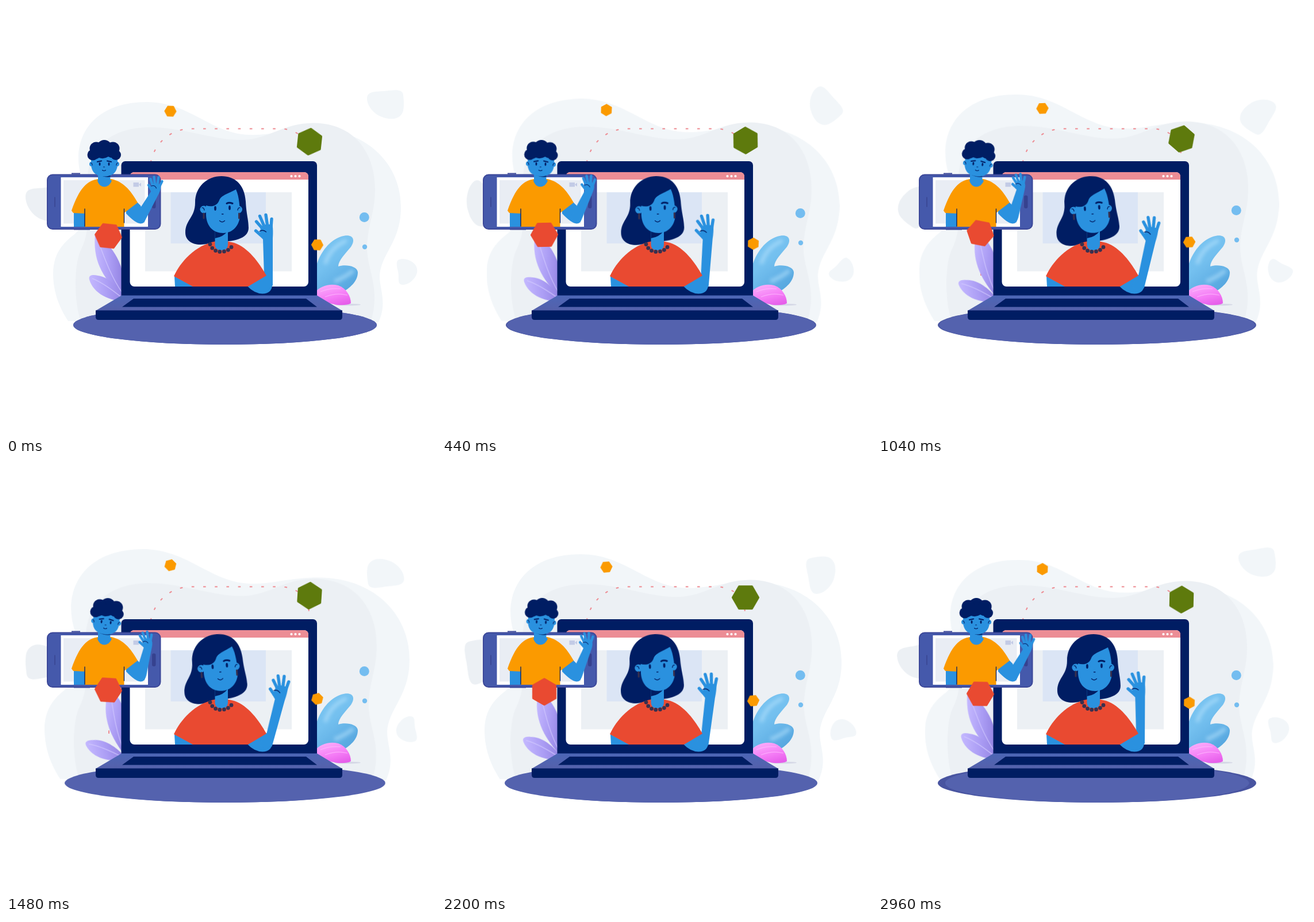
An HTML page without scripts for the animation above (3000 ms loop, 748 by 748 pixels).

```html
<!DOCTYPE html>
<html lang="en">
<head>
<meta charset="utf-8">
<title>Video call</title>
<style>
html, body { margin: 0; width: 100%; height: 100%; overflow: hidden; background: #fff; }
svg { display: block; width: 100vw; height: 100vh; }
.navy { fill: #001d63; }
.skin { fill: #2a91df; }
.ink { fill: none; stroke: #001d63; stroke-linecap: round; }
.fingers { fill: none; stroke: #2a91df; stroke-linecap: round; }
.glow { fill: none; stroke-linecap: round; filter: url(#soft); }
.pale { fill: #f2f6f9; }
.mist { fill: #ecf0f4; }

.grow, .grow2, .base, .bob, .leaf1, .leaf2 { animation: 1.5s linear infinite alternate; }
.grow { animation-name: grow; transform-origin: 384.5px 547px; }
.grow2 { animation-name: grow2; transform-origin: 381px 545px; }
.base { animation-name: base; transform-origin: 381px 555px; }
.bob { animation-name: bob; }
.leaf1 { animation-name: leaf1; transform-origin: 210px 510px; }
.leaf2 { animation-name: leaf2; transform-origin: 210px 510px; }
@keyframes grow { to { transform: scale(1.05); } }
@keyframes grow2 { to { transform: scale(1.011); } }
@keyframes base { to { transform: scaleX(1.057); } }
@keyframes bob { to { transform: translateY(-7px); } }
@keyframes leaf1 { to { transform: rotate(12deg); } }
@keyframes leaf2 { to { transform: rotate(-12deg); } }

.ring { animation: ring 3s linear infinite; transform-origin: 381px 555px; }
@keyframes ring { 0%, 66.67% { transform: none; } 33.33%, 100% { transform: scaleX(1.051); } }

.spin { animation: spin 3s linear infinite; }
@keyframes spin { to { transform: rotate(360deg); } }
.tumble { animation: tumble 3s linear infinite; }
@keyframes tumble {
  0% { transform: rotate(32deg); } 14.67% { transform: rotate(62deg); }
  34.67% { transform: rotate(87deg); } 49.33% { transform: rotate(135deg); }
  73.33% { transform: rotate(205deg); } 88% { transform: rotate(276deg); }
  98.67%, 100% { transform: rotate(302deg); }
}
.drift { animation: drift 3s linear infinite; }
@keyframes drift {
  14.67% { transform: translate(3px, 3px); } 34.67% { transform: translate(1px, 17px); }
  49.33% { transform: translateY(19px); } 73.33% { transform: translateY(22px); }
  88% { transform: translate(-2px, 5px); }
}
.float { animation: float 3s linear infinite; }
@keyframes float {
  0%, 66.67%, 100% { transform: none; } 14.67%, 49.33% { transform: translateY(-7px); }
  33.33% { transform: translateY(-12.5px); }
}

/* --a is the full swing angle */
.sway { animation: sway 3s linear infinite; }
@keyframes sway {
  0%, 100% { transform: none; }
  14.67% { transform: rotate(calc(var(--a) * .31)); }
  34.67% { transform: rotate(calc(var(--a) * .89)); }
  44%, 49.33% { transform: rotate(var(--a)); }
  73.33% { transform: rotate(calc(var(--a) * .51)); }
  88% { transform: rotate(calc(var(--a) * .19)); }
}
.armW { --a: 15.5deg; transform-origin: 446px 484px; }
.headW { --a: -4deg; transform-origin: 372px 418px; }
.armM { --a: -16deg; transform-origin: 234px 366px; }
.headM { --a: 6deg; transform-origin: 172px 305px; }
</style>
</head>
<body>
<svg viewBox="0 0 748 748">
<defs>
  <path id="hex" d="M0-22 19-11V11L0 22-19 11V-11Z" fill="currentColor" stroke="currentColor" stroke-width="4" stroke-linejoin="round"/>
  <path id="pebble" d="M-32-10C-32-23-18-22-2-23 14-25 30-28 31-16 32-8 33 6 30 14 25 25 12 28-3 23-18 19-32 4-32-10Z"/>
  <filter id="soft" x="-50%" y="-50%" width="200%" height="200%"><feGaussianBlur stdDeviation="3"/></filter>
  <linearGradient id="lilac"><stop stop-color="#c4b8ff"/><stop offset=".5" stop-color="#ab9df4"/><stop offset="1" stop-color="#9080e0"/></linearGradient>
  <linearGradient id="sky" x1="0" y1="0" x2=".6" y2="1"><stop stop-color="#7cc6f2"/><stop offset=".5" stop-color="#74c0ef"/><stop offset="1" stop-color="#58a8e0"/></linearGradient>
  <linearGradient id="pink" x1=".2" y1="0" x2=".7" y2="1"><stop stop-color="#fbb0fb"/><stop offset=".6" stop-color="#f57df6"/><stop offset="1" stop-color="#e65fea"/></linearGradient>
  <linearGradient id="deck" x1="0" y1="0" x2="0" y2="1"><stop stop-color="#4c66b6"/><stop offset="1" stop-color="#5561ab"/></linearGradient>
</defs>

<!-- backdrop -->
<path class="pale grow" d="M108 548C94 526 82 500 82 465 82 430 100 412 118 398 150 372 140 330 130 295 113 230 150 167 245 167 312 167 348 211 403 222 450 230 480 214 535 214 628 214 687 275 687 350 687 410 653 430 650 468 649 492 664 515 648 550Z"/>
<path class="mist grow2" d="M130 548C118 515 118 450 130 425 150 385 140 345 142 300 143 245 185 211 250 211 310 211 360 234 412 233 460 231 480 204 535 203.500 606 204 642 255 642 320 642 358 629 382 628 420 628 460 652 490 635 548Z"/>
<g class="drift"><g transform="translate(660 171)"><use href="#pebble" class="pale spin"/></g></g>
<g transform="translate(697 462)"><path class="pale spin" d="M-15-20C-6-25 8-20 14-13 21-5 19 6 11 14 5 21-5 25-11 22-16 19-13 9-15 0-17-8-19-17-15-20Z"/></g>
<g transform="translate(66 344) scale(1 1.2)"><use href="#pebble" class="mist spin"/></g>

<g class="float" fill="#74bdf0"><circle cx="623.3" cy="367.5" r="8.5"/><circle cx="624" cy="419" r="4.2"/></g>

<ellipse class="ring" cx="381" cy="555" rx="264" ry="34" fill="#4854a0"/>
<ellipse class="base" cx="381" cy="555" rx="264" ry="34" fill="#5462ae"/>

<!-- dashed route -->
<g fill="none" stroke="#ee8b92" stroke-width="2">
  <path d="M179 469V420" stroke-dasharray="5.5 15.5"/>
  <path d="M252 271C258 240 285 213.500 322 213.500H475C505 213.500 527 230 527 260" stroke-dasharray="4.6 15.6" stroke-dashoffset="2"/>
</g>

<!-- plants -->
<g class="leaf1">
  <path d="M206 508C175 480 150 450 155 398 180 410 212 450 206 508Z" fill="url(#lilac)"/>
  <path d="M160 408C170 435 182 470 203 500" fill="none" stroke="#d3caff" stroke-width="1.5" opacity=".7"/>
</g>
<g class="leaf2">
  <path d="M210 514C180 514 152 500 145 476 143 468 150 467 160 469 182 472 200 494 210 514Z" fill="url(#lilac)"/>
  <path d="M150 474C168 481 188 496 206 511" fill="none" stroke="#d3caff" stroke-width="1.5" opacity=".7"/>
</g>
<path d="M541 448C548 428 562 408 583 401 603 395 609 406 600 419 590 431 578 443 578 453 590 449 611 452 612 463 612 480 598 490 583 500H538Z" fill="url(#sky)"/>
<path class="glow" stroke="#b4e1fc" stroke-width="7" opacity=".6" d="M556 446C562 428 575 416 590 409M574 478C584 474 594 468 602 462"/>
<ellipse cx="594" cy="519.5" rx="23" ry="1.8" fill="#d5d8e6"/>
<path d="M536 500C545 487 563 482 578 486 592 491 600 505 600 517Q594 521 576 520L548 514Z" fill="url(#pink)"/>
<path d="M547 497Q564 490 582 492M555 506Q575 498 594 503" fill="none" stroke="#ffc5ff" stroke-width="1.2" opacity=".6"/>

<!-- laptop -->
<rect class="navy" x="200.500" y="270" width="340.500" height="240" rx="7"/>
<rect x="215.500" y="289" width="310.500" height="199" rx="8" fill="#fff"/>
<path d="M215.500 302V297Q215.500 289 223.500 289H518Q526 289 526 297V302Z" fill="#ec8d95"/>
<g fill="#fff"><circle cx="496.500" cy="296" r="2.1"/><circle cx="503.500" cy="296" r="2.1"/><circle cx="510.500" cy="296" r="2.1"/></g>
<path class="mist" d="M242 324H497V461.500H242Z"/>
<path d="M286.500 324H452V413H286.500Z" fill="#dbe5f5"/>
<path d="M201 503.500H541L585 530H156Z" fill="url(#deck)"/>
<path class="navy" d="M222 509H522L541 523.500H202ZM156 529.500H585V541Q585 546 580 546H161Q156 546 156 541Z"/>

<!-- woman -->
<g class="headW sway">
  <path class="navy" d="M375 296C350 296 329 314 329 342 329 368 312 372 312 394 312 408 324 415 338 415 350 415 360 410 372 410 392 410 422 406 422 386 422 372 418 362 417 340 415 310 398 296 375 296Z"/>
</g>
<path class="skin" d="M452 468 420 487.500Q432 500 446 500.500 462 500 463 486L460 470Z"/>
<g class="armW sway">
  <path class="skin" d="M443 385Q451 377 463.500 381 465 390 464 404V486Q454 498 441 488L449 468 447 406 441 399Z"/>
  <path class="fingers" stroke-width="5.400" d="M447 402 434.500 391M447 388 435.500 375M449.500 384 441.500 365.500M455 384 452 363.500M461 385 462 370.500"/>
  <path class="ink" stroke-width="1.300" d="M441 392Q447 388 452.500 393"/>
</g>
<path class="skin" d="M293 470 326 488H294Z"/>
<path d="M366 409C328 416 303 446 292 470L325 488H421L453 469C440 446 421 420 397 412L384 409Z" fill="#e94a31"/>
<path class="skin" d="M363.500 384H386V414Q386 425 375 425 363.500 425 363.500 414Z"/>
<path class="navy" d="M363.500 391H386Q378 402 363.500 404Z"/>
<path d="M355 414.500Q360 427.500 374 427.500 390 427 395 414" fill="none" stroke="#39304e" stroke-width="6.800" stroke-linecap="round" stroke-dasharray="0 7.500"/>
<g class="headW sway">
  <g class="skin"><circle cx="344" cy="354" r="6.500"/><circle cx="404.500" cy="354" r="6.500"/>
    <path d="M348 347C358 350 367 348 371 338 374 329 388 326 400 319 406 332 407 352 407 366 405 384 393 395 378 395 361 395 349 384 348 364Z"/></g>
  <ellipse class="navy" cx="364" cy="352" rx="1.900" ry="4"/><ellipse class="navy" cx="389" cy="351" rx="1.900" ry="4"/>
  <path class="ink" stroke-width="3" d="M384 343.500Q388 341 394 343.500"/>
  <path class="ink" stroke-width="1.300" d="M371.500 373.500Q376 378 380.500 373.500M375.500 362H378M341 351Q344 350 345 355M407 351Q404 350 403 355"/>
  <path d="M344 361V369M405.500 361V369" stroke="#39304e" stroke-width="3" stroke-linecap="round"/>
</g>

<!-- phone -->
<path d="M114 291.500H129M178 291.500H186M118 388.500H146" stroke="#3a4697" stroke-width="2"/>
<rect x="72" y="293.500" width="196.500" height="94.500" rx="9" fill="#4559ab" stroke="#3c4899" stroke-width="2"/>
<path d="M95.500 298H247V384H95.500Z" fill="#fff"/>
<path d="M100 303H241.500V378.500H100Z" fill="#e9edf4"/>
<path d="M85 333V349" stroke="#38458f" stroke-width="1.500" stroke-linecap="round"/>
<rect x="254" y="329.500" width="6.500" height="22.500" rx="3" fill="#36428f"/>
<path d="M221.500 307H231V314.500H221.500ZM231.500 310 235 307.500V314L231.500 311.500Z" fill="#c3cbe6"/>

<!-- man -->
<path class="skin" d="M118 359H138V384H118ZM209 356 228 341 234 347 243 368Q243 378 234 378.500 225 378 209 361Z"/>
<g class="armM sway">
  <path class="skin" d="M253 312Q260 306 269 311 270 319 266 326L243 371Q236 381 226 373L224 366 252 323Z"/>
  <path class="fingers" stroke-width="4.400" d="M254 321 248 311.500M255 312 251.500 301M259 310 257.500 297.500M263.500 310 265.500 298M267.500 313 271.500 305"/>
  <path class="ink" stroke-width="1.100" d="M253 313Q259 311 261.500 317"/>
</g>
<path d="M160 301C141 304 128 316 114 356L117 360 137 361V384H205.500V360L229 342C216 319 203 305 183 301Z" fill="#fb9a00"/>
<path class="ink" stroke-width="1.300" d="M137 353V383M205.500 353V377"/>
<path class="skin" d="M160 288H181.500V302L184 304Q180 314 171 314.500 162 314 159 304L160 302Z"/>
<path class="navy" d="M163 294H181.500V297Q173 299 163 294Z"/>
<g class="headM sway">
  <path class="skin" d="M148 262H194V277C193 290 184 296.500 171 296.500 158 296.500 149 290 148 277Z"/>
  <g class="skin"><circle cx="149" cy="275" r="4"/><circle cx="193" cy="275" r="4"/></g>
  <g class="navy">
    <circle cx="171" cy="246" r="13"/><circle cx="157" cy="248" r="11.500"/><circle cx="186" cy="248" r="11.500"/>
    <circle cx="151" cy="259" r="9.500"/><circle cx="191" cy="259" r="9"/><path d="M148 246H194V263Q184 266 178 262 170 267 162 264 156 268 150 266Z"/>
    <ellipse cx="163" cy="275" rx="1.500" ry="2.900"/><ellipse cx="179" cy="275" rx="1.500" ry="2.900"/>
  </g>
  <path class="ink" stroke-width="2.200" d="M159 271 166 269.500M176 269.500 183 271"/>
  <path class="ink" stroke-width="1.100" d="M167.500 285.500Q170.500 288 173.500 285.500M169.500 280H171.500M147.500 273Q150 273 150 277M194.500 273Q192 273 192 277"/>
</g>

<!-- hexagons -->
<g class="bob">
  <g transform="translate(528 236) rotate(6)" color="#5e7a0d"><use href="#hex" class="spin"/></g>
  <g transform="translate(178 400) rotate(36)" color="#e94a31"><use href="#hex" class="spin"/></g>
  <g color="#fb9a00">
    <g transform="translate(286 183) scale(.44)"><use href="#hex" class="tumble"/></g>
    <g transform="translate(541.500 415.500) scale(.44)"><use href="#hex" class="tumble"/></g>
  </g>
</g>
</svg>
</body>
</html>
```
